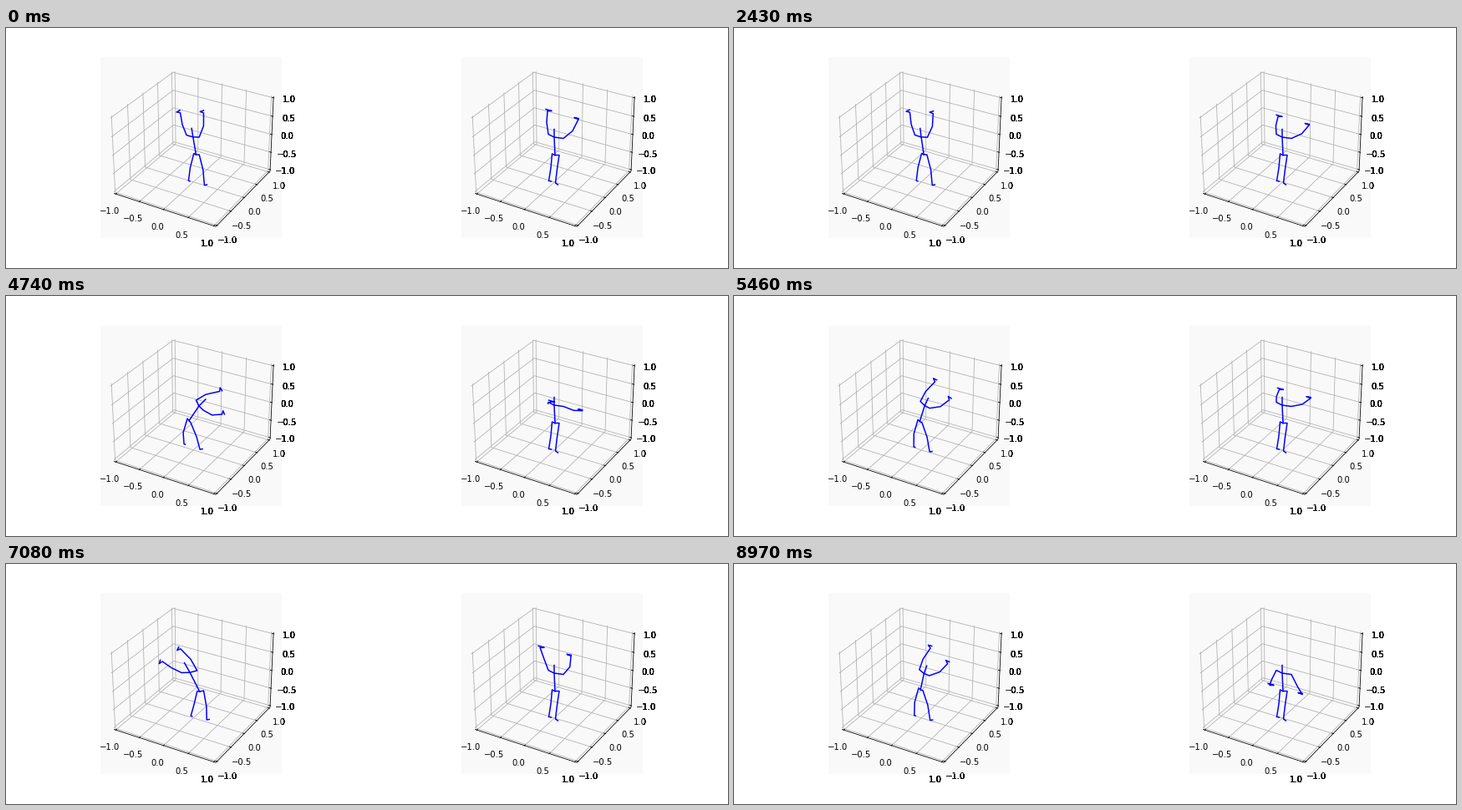
Recreate the animation shown at these times as a matplotlib script. Size 864 by 288 pixels, loop 9 s.

```python
import numpy as np
import matplotlib.pyplot as plt
from matplotlib.animation import FuncAnimation
from matplotlib.collections import LineCollection
from matplotlib.patches import Rectangle

W, H, DPI = 864, 288, 72
FRAMES, STEP = 300, 30
X0, BASE, SIDE = 112.6, 252, 217.44   # view box: left, bottom, edge length
SHIFT = np.array([432, 0])            # distance between the two views
E = 1 + 1 / 24                        # cube half-size with margin
TICKS = np.linspace(-1, 1, 5)

plt.rcParams["font.family"] = "DejaVu Sans"
fig = plt.figure(figsize=(W / DPI, H / DPI), dpi=DPI, facecolor="white")
ax = fig.add_axes([0, 0, 1, 1])
ax.set(xlim=(0, W), ylim=(H, 0))
ax.axis("off")


def project(p):
    """Perspective view of the 4:4:3 cube at elevation 30, azimuth -60."""
    p = np.asarray(p, float) * [0.5714, 0.5714, 0.4286]
    el, az = np.radians(30), np.radians(-60)
    eye = np.array([np.cos(el) * np.cos(az), np.cos(el) * np.sin(az), np.sin(el)])
    right = np.array([-np.sin(az), np.cos(az), 0])
    up = np.cross(eye, right)
    depth = 10 - p @ eye
    u, v = p @ right / depth, p @ up / depth
    k = SIDE / 0.185
    return np.stack([X0 + (u + 0.095) * k, BASE - (v + 0.095) * k], axis=-1)


def draw_cube(shift):
    grid, marks = [], []
    for t in TICKS:
        grid += [[(t, -E, -E), (t, E, -E), (t, E, E)],
                 [(E, t, -E), (-E, t, -E), (-E, t, E)],
                 [(-E, -E, t), (-E, E, t), (E, E, t)]]
        out, inn = E + 1 / 60, E - 1 / 30
        marks += [[(t, -out, -E), (t, -inn, -E)],
                  [(out, t, -E), (inn, t, -E)],
                  [(out, E, t), (inn, E, t)]]
    edges = [[(-E, -E, -E), (E, -E, -E)],
             [(E, -E, -E), (E, E, -E)],
             [(E, E, -E), (E, E, E)]]

    ax.add_patch(Rectangle(shift + [X0, BASE - SIDE], SIDE, SIDE,
                           fc="#f9f9f9", ec="none", zorder=2))
    for lines, color, z in ((grid, "#b0b0b0", 3), (edges + marks, "black", 4)):
        ax.add_collection(LineCollection([project(l) + shift for l in lines],
                                         colors=color, linewidths=0.8, zorder=z))

    far = E + 0.2116
    for t in TICKS:
        for spot in ((t, -far, -far), (far, t, -far), (far, far, t)):
            x, y = project(spot) + shift
            text = f"{t:.1f}".replace("-", "\u2212")
            # labels outside the box are overprinted and look heavier
            outside = x - shift[0] > 315 or y > 247
            for z in [5] + [1] * 6 * outside:
                ax.text(x, y, text, size=10, ha="center", va="top", zorder=z)


def ease(t, times, values):
    """Cosine easing through a few key values."""
    i = min(np.searchsorted(times, t, side="right"), len(times) - 1)
    u = (t - times[i - 1]) / (times[i] - times[i - 1])
    k = (1 - np.cos(np.pi * u)) / 2
    return values[i - 1] + k * (values[i] - values[i - 1])


def swing(t):
    """Sway of the dancer: -1 is fully left, 1 fully right."""
    turns = [-1000, 1300, 3350, 4800, 6850, 8050, 10540]
    return ease(t, turns, [-1, 1] * 3 + [-1])


def drop(t):
    """How far the arms of the steady figure are lowered."""
    return ease(t, [0, 1900, 2790, 3500, 4740, 6120, 7200, 9000],
                [0, 0.42, 0, 0, 0.6, 0, 0, 1])


def polar(length, angle):
    """Screen vector; the angle runs clockwise from straight up."""
    a = np.radians(angle)
    return length * np.array([np.sin(a), -np.cos(a)])


def chain(start, *steps):
    return np.cumsum([start, *steps], axis=0)


def bones(j, arms):
    def leg(side, toe):
        foot = j["ankle" + side]
        return [j["root"], j["hip" + side], j["knee" + side], foot, foot + toe]

    return [[j["head"], j["neck"], j["root"]],
            leg("A", j["toeA"]), leg("B", j["toeB"]),
            *([j["neck"], *arm] for arm in arms)]


# Joints of the swaying figure: rest position, then travel per unit of swing
SWAY = {"head": (225, 121, 14, 3), "neck": (225, 131, 6, 1),
        "root": (226, 151.5, -7, -2),
        "shoulderA": (218, 128, 9.5, -3), "shoulderB": (232, 132, 4, 5),
        "hipA": (223.5, 150, -6.5, -3), "hipB": (229.5, 152, -8.5, 0),
        "kneeA": (219, 167, -7, -3), "kneeB": (234.5, 170, -6.5, -1),
        "ankleA": (217.5, 183, -4.5, -2), "ankleB": (236.5, 188.5, -4.5, -1),
        "toeA": (1.5, 0.5, 0, 0), "toeB": (3, -0.5, 0, 0)}

STEADY = {"head": (224, 121.5), "neck": (224, 131), "root": (225, 152.5),
          "shoulderA": (217, 127.5), "shoulderB": (235, 132.5),
          "hipA": (221.5, 151), "hipB": (230, 152.5),
          "kneeA": (220, 168), "kneeB": (227.5, 169.5),
          "ankleA": (217.5, 183.5), "ankleB": (225.5, 186),
          "toeA": (3, 0.5), "toeB": (3, 2)}
STEADY = {name: np.array(p, float) for name, p in STEADY.items()}


def swaying(s):
    j = {n: np.array([x + s * dx, y + s * dy])
         for n, (x, y, dx, dy) in SWAY.items()}
    for side in "AB":
        j["ankle" + side][1] -= 3.5 * s * s

    def arm(side, upper, fore, angle):
        wrist = chain(j["shoulder" + side], upper, fore)
        hand = [wrist[-1] + polar(4.5, angle - 70), wrist[-1] + polar(3, angle)]
        return [*wrist, *hand]

    a, b = 5 + 73 * s, 15 + 72 * s
    return bones(j, [
        arm("A", polar(13.5, -8 + 68 * s), polar(15 + 2 * s, a), a),
        arm("B", polar(14 - 2 * s, 38 + 82 * s), polar(15 - 3 * s, b), b)])


def steady(s, d):
    twist = np.clip((-s - 0.5) * 2.5, 0, 1)
    bow = np.array([16 * d * (1 - d), 0])

    def bone(high, low, turn):
        high, low = np.array(high), np.array(low)
        return high + d * (low - high) + bow + twist * np.array(turn)

    def arm(side, upper, fore, thumb, tip):
        path = chain(STEADY["shoulder" + side],
                     bone(*upper, (-4, 0)), bone(*fore, (-7, 1)))
        return [*path, path[-1] + thumb, path[-1] + tip]

    return bones(STEADY, [
        arm("A", ((-2, -14), (-6, 12)), ((1, -14), (-2, 6)), (5, 0), (-2, -2)),
        arm("B", ((11, -9), (7, 14)), ((7, -14), (6, 10)), (-5, -2), (0, -1))])


for shift in (0 * SHIFT, SHIFT):
    draw_cube(shift)
figures = LineCollection([], colors="blue", linewidths=1.5, zorder=6,
                         joinstyle="round", capstyle="projecting")
ax.add_collection(figures)


def update(n):
    t = n * STEP
    s = swing(t)
    right = [np.array(line) + SHIFT for line in steady(s, drop(t))]
    figures.set_segments(swaying(s) + right)
    return [figures]


anim = FuncAnimation(fig, update, frames=FRAMES, interval=STEP,
                     repeat=True, repeat_delay=0)
plt.show()
```
